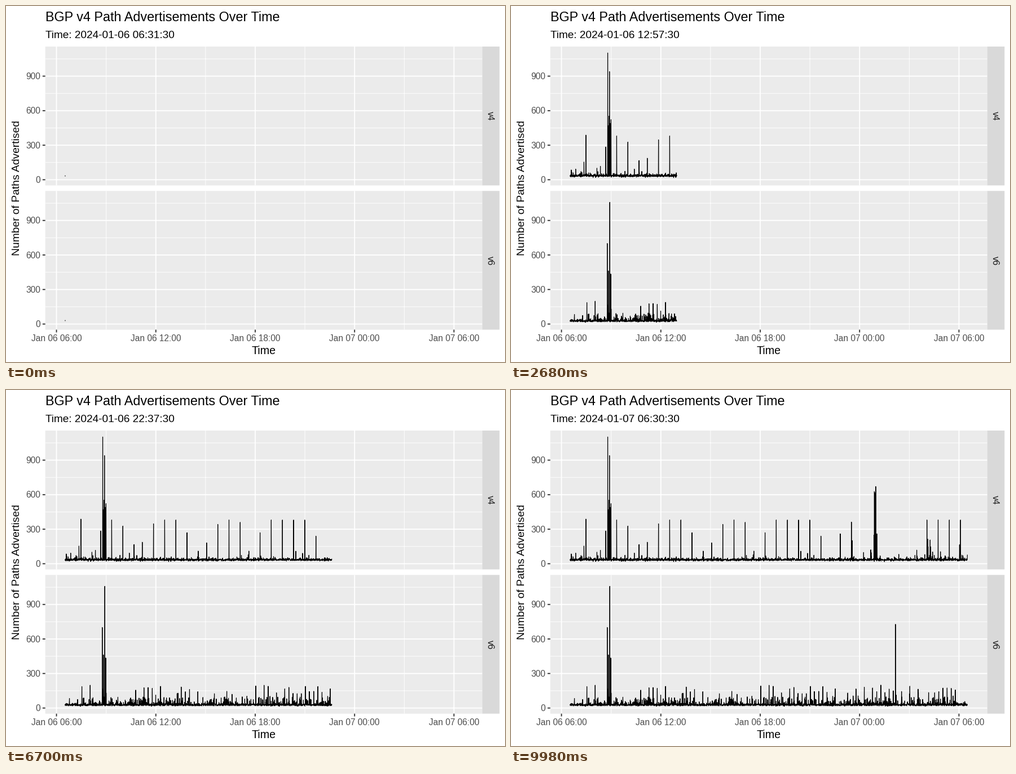
Write a matplotlib script that moves like this. It is 885 px wide and 632 px high and loops after 10000 ms.

```python
import numpy as np
import matplotlib.pyplot as plt
from matplotlib.animation import FuncAnimation
from matplotlib.patches import Rectangle

W, H = 885, 632
FRAMES, INTERVAL = 500, 20
STEPS = 2878              # half-minute samples after the first one
START = 6.525             # first sample, in hours after midnight
LEFT, RIGHT, STRIP = 69.7, 844.6, 875.3
X0, X1 = 104.95, 809.4
HOUR_PX = (X1 - X0) / STEPS * 120
UNIT_PX = 0.2043          # pixels per advertised path
GREY = "#4D4D4D"

# name: (panel top, panel bottom, y of zero)
PANELS = {"v4": (72.0, 318.5, 308.4), "v6": (328.3, 574.6, 564.6)}

plt.rcParams["font.family"] = "Liberation Sans"

hours = START + np.arange(STEPS + 1) / 120


def clock_x(hour):
    return X0 + (hour - START) * HOUR_PX


def put(y, hour, value):
    """Set the sample nearest to a time."""
    y[int(round((hour - START) * 120))] = value


def bristle(y, rng, rate, draw):
    """Replace a random share of the samples by short spikes."""
    hit = rng.random(y.size) < rate
    y[hit] = draw(hit.sum())


def burst(y, rng, start, end, share, top):
    inside = (hours > start) & (hours < end)
    bristle(y, rng, inside * share, lambda n: rng.uniform(60, top, n))


def make_v4(rng):
    n = hours.size
    y = 30 + rng.normal(0, 4, n) + rng.exponential(5, n)
    busy = (hours < 11.7) | (hours > 23.5)
    bristle(y, rng, np.where(busy, 0.035, 0.010),
            lambda k: 50 + rng.exponential(25, k))
    burst(y, rng, 8.78, 9.0, 0.4, 330)
    burst(y, rng, 24.86, 25.05, 0.6, 260)
    burst(y, rng, 28.05, 28.3, 0.2, 240)

    # spikes 40.5 minutes apart, in runs that swell and fade:
    # (start, count, first height, last height)
    runs = [(9.335, 3, 390, 167), (11.187, 6, 187, 110), (15.068, 4, 182, 360),
            (17.618, 7, 110, 240), (22.837, 2, 260, 362), (28.066, 4, 402, 384)]
    for start, count, first, last in runs:
        for k in range(count):
            rise, fall = first + 160 * k, last + 160 * (count - 1 - k)
            put(y, start + 0.675 * k, min(380, rise, fall))

    for hour, value in [(7.473, 388), (8.665, 285), (8.794, 1102),
                        (8.835, 470), (8.869, 553), (8.903, 940),
                        (8.954, 490), (8.991, 522), (24.893, 628),
                        (24.930, 618), (24.978, 671), (25.039, 260)]:
        put(y, hour, value)
    return y


def make_v6(rng):
    n = hours.size
    y = 22 + rng.normal(0, 3, n) + rng.exponential(7, n)
    bristle(y, rng, 0.085, lambda k: rng.uniform(45, 98, k))
    bristle(y, rng, 0.006, lambda k: rng.uniform(98, 150, k))
    burst(y, rng, 8.76, 8.98, 0.35, 260)

    # taller spikes on a quarter-hour beat, more frequent later on
    for hour in np.arange(6.783, hours[-1], 0.25):
        if rng.random() < 0.25 + 0.016 * (hour - START):
            put(y, hour, rng.uniform(125, 200))

    for hour, value in [(8.767, 700), (8.835, 462), (8.913, 1058),
                        (8.971, 435), (26.170, 728)]:
        put(y, hour, value)
    return y


SERIES = {"v4": make_v4(np.random.default_rng(4)),
          "v6": make_v6(np.random.default_rng(6))}

fig = plt.figure(figsize=(W / 72, H / 72), dpi=72, facecolor="white")
ax = fig.add_axes([0, 0, 1, 1])
ax.set_xlim(0, W)
ax.set_ylim(H, 0)
ax.axis("off")


def box(x0, y0, x1, y1, color):
    ax.add_patch(Rectangle((x0, y0), x1 - x0, y1 - y0, fc=color, lw=0,
                           snap=False, zorder=0))


def segments(pairs, color, width, zorder):
    """Draw many separate straight strokes as one line."""
    gap = (np.nan, np.nan)
    pts = np.array([p for a, b in pairs for p in (a, b, gap)])
    ax.plot(pts[:, 0], pts[:, 1], color=color, lw=width, zorder=zorder,
            solid_capstyle="butt", snap=False)


def label(x, y, text, size, color="black", ha="left", rotation=0):
    return ax.text(x, y, text, fontsize=size, color=color, ha=ha,
                   va="baseline", rotation=rotation,
                   rotation_mode="anchor", zorder=5)


major_x = [clock_x(h) for h in range(6, 31, 6)]
minor_x = [clock_x(h) for h in range(9, 28, 6)]
major, minor, ticks, curves = [], [], [], []

for name, (top, bottom, zero) in PANELS.items():
    box(LEFT, top, RIGHT, bottom, "#EBEBEB")
    box(RIGHT, top, STRIP, bottom, "#D9D9D9")
    label(854, (top + bottom) / 2 + 0.3, name, 15.5, "#1A1A1A", "center", 270)
    for value in range(0, 901, 300):
        y = zero - value * UNIT_PX
        y_mid = y - 150 * UNIT_PX
        major.append(((LEFT, y), (RIGHT, y)))
        minor.append(((LEFT, y_mid), (RIGHT, y_mid)))
        ticks.append(((LEFT - 4.85, y), (LEFT, y)))
        label(61.4, y + 5.5, str(value), 15.5, GREY, "right")
    major += [((x, top), (x, bottom)) for x in major_x]
    minor += [((x, top), (x, bottom)) for x in minor_x]

    values = np.maximum(SERIES[name], 14)
    # a second value at the first time makes the line start as a short mark
    values = np.r_[values[0] + 8, values]
    curve, = ax.plot([], [], color="black", lw=1.15, zorder=4,
                     solid_capstyle="butt", solid_joinstyle="round",
                     snap=False)
    curves.append((curve, zero - values * UNIT_PX))

line_x = np.r_[X0, clock_x(hours)]

floor = PANELS["v6"][1]
for k, x in enumerate(major_x, 1):
    day, hour = divmod(6 * k, 24)
    ticks.append(((x, floor), (x, floor + 4.85)))
    label(x, 594.6, f"Jan {6 + day:02d} {hour:02d}:00", 15.5, GREY, "center")

segments(minor, "white", 0.94, 1)
segments(major, "white", 1.88, 2)
segments(ticks, "#333333", 1.88, 3)

label(69.7, 27, "BGP v4 Path Advertisements Over Time", 23.4)
label(457.2, 618, "Time", 19.6, ha="center")
label(24.5, 323.3, "Number of Paths Advertised", 19.3, ha="center", rotation=90)
subtitle = label(69.7, 56.6, "", 19.05)


def stamp(step):
    """Date and time of a half-minute step."""
    minutes, half = divmod(round(START * 120) + step, 2)
    hour, minute = divmod(minutes, 60)
    day, hour = divmod(hour, 24)
    return f"2024-01-{6 + day:02d} {hour:02d}:{minute:02d}:{30 * half:02d}"


def update(i):
    step = STEPS * i // (FRAMES - 1)
    subtitle.set_text("Time: " + stamp(step))
    for curve, y in curves:
        curve.set_data(line_x[:step + 2], y[:step + 2])
    return [subtitle] + [curve for curve, _ in curves]


anim = FuncAnimation(fig, update, frames=FRAMES, interval=INTERVAL,
                     repeat=True, repeat_delay=0)
plt.show()
```
